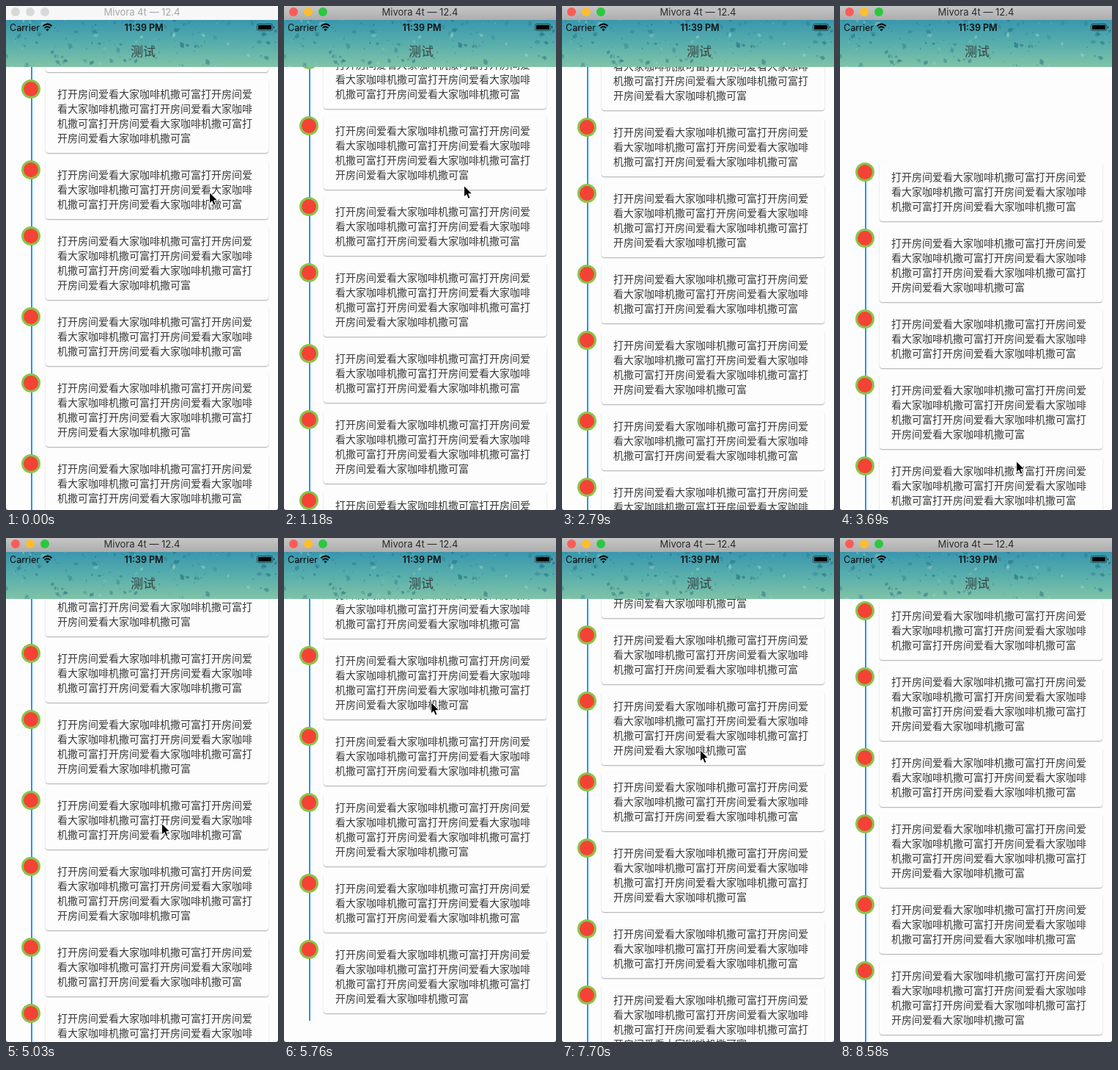
These frames come from a looping animation (371x686 px, 8.88 s). An HTML page:

```html
<!DOCTYPE html>
<html lang="zh-CN">
<head>
<meta charset="utf-8">
<title>Timeline list</title>
<style>
html, body { margin: 0; width: 100%; height: 100%; overflow: hidden; background: #3a3a3a; }
#win {
  position: absolute; left: 0; top: 0; width: 371px; height: 686px;
  overflow: hidden; background: #fdfdfd; border-radius: 0 0 3px 3px;
  font-family: Inter, Roboto, sans-serif; color: #111;
}
#win div, #win svg { position: absolute; }
#bar {
  left: 0; top: 0; width: 371px; height: 19px; z-index: 2;
  background: #f7f7f7; color: #a6a6a6;
  font-size: 13px; line-height: 17px; text-align: center;
}
#bar div { top: 2px; width: 12px; height: 12px; border-radius: 50%; background: #d9d9d9; }
#bar.on { background: linear-gradient(#c6c6c6, #adadad); color: #2b2b2b; }
#bar.on div { background: var(--c); }
#head { left: 0; top: 19px; width: 371px; height: 64px; z-index: 1; }
#head div { white-space: nowrap; }
#carrier { left: 5px; top: 2px; font-size: 12.5px; line-height: 17px; }
#clock { left: 88px; width: 200px; top: 2px; text-align: center; font-size: 12.5px; font-weight: 600; line-height: 17px; }
#title {
  left: 87px; width: 200px; top: 30px; text-align: center; color: #3a4444;
  font: 17px/24px "Noto Sans CJK SC", "Noto Sans CJK", sans-serif;
}
#list { left: 0; top: 0; width: 371px; }
.item { left: 0; width: 371px; }
.line { left: 34px; top: 0; width: 2px; height: 100%; background: #2196f3; }
.dot {
  left: 21px; top: 0; width: 20px; height: 20px; border-radius: 50%;
  border: 3px solid #8bc34a; background: #f44336;
}
.card {
  left: 54px; top: 0; bottom: 10px; width: 272px; padding: 9px 16px 0;
  border-radius: 4px; background: #fdfdfd;
  box-shadow: 0 1px 1.5px rgba(0,0,0,.32);
  font: 300 14px/20px "Noto Sans CJK SC", "Noto Sans CJK", sans-serif; color: #3a3a3a;
}
#cursor { left: 0; top: 0; z-index: 3; overflow: visible; }
</style>
</head>
<body>
<div id="win">
  <div id="list"></div>
  <div id="head">
    <svg id="sky" width="371" height="64">
      <defs><linearGradient id="sea" x2="0" y2="1">
        <stop offset="0" stop-color="#3997ae"/>
        <stop offset=".5" stop-color="#58aeac"/>
        <stop offset="1" stop-color="#80c3a7"/>
      </linearGradient></defs>
      <rect width="371" height="64" fill="url(#sea)"/>
    </svg>
    <div id="carrier">Carrier</div>
    <svg width="371" height="20" fill="none" stroke="#000" stroke-width="1.9">
      <path d="M50.4 8.3Q56.5 2.7 62.6 8.3M52.7 11Q56.5 7.4 60.3 11"/>
      <path d="M56.5 15.2L54.4 12.9Q56.5 11.2 58.6 12.9Z" fill="#000" stroke="none"/>
      <rect x="342.5" y="5.5" width="21" height="9" rx="2" stroke-width="1" opacity=".5"/>
      <rect x="344" y="7" width="18" height="6" rx=".7" fill="#000" stroke="none"/>
      <path d="M365 8.3q2 1.7 0 3.4z" fill="#000" stroke="none"/>
    </svg>
    <div id="clock">11:39 PM</div>
    <div id="title">测试</div>
  </div>
  <div id="bar">
    <div style="left:7px;--c:#fc5b57"></div>
    <div style="left:27px;--c:#fdbd2e"></div>
    <div style="left:47px;--c:#2ac840"></div>
    <span>Mivora 4t — 12.4</span>
  </div>
  <svg id="cursor" width="14" height="20">
    <path d="M.5.5V16L4 12.7L6.3 18.3L9 17.2L6.7 11.7H11.7Z" fill="#000" stroke="#fff" stroke-width="1"/>
  </svg>
</div>
<script>
const LOOP = 8880, STEP = 148, EARLY = 25, LAST = 58, FOCUS = 6, ITEMS = 12, DOT_R = 13;
const $ = id => document.getElementById(id);

// Rows alternate between three and four lines of text.
const phrase = '打开房间爱看大家咖啡机撒可富';
let rowTop = 0;
for (let i = 0; i < ITEMS; i++) {
  const h = i % 2 ? 110 : 90;
  $('list').insertAdjacentHTML('beforeend',
    `<div class="item" style="top:${rowTop}px;height:${h}px"><div class="line"></div>` +
    `<div class="card">${phrase.repeat(i % 2 ? 5 : 4)}</div><div class="dot"></div></div>`);
  rowTop += h;
}

// Mostly dark flakes over the header gradient, denser near the top.
let seed = 29;
const rnd = () => (seed = seed * 16807 % 2147483647) / 2147483647;
let flakes = '';
for (let i = 0; i < 170; i++) {
  const x = rnd() * 371, y = 64 * rnd() ** 1.3, r = 1 + 4 * rnd() ** 2, a = rnd() * 180;
  flakes += `<path d="M${-r} 0L0 ${-r * .7}L${r} ${-r * .1}L${r * .3} ${r * .7}Z" ` +
    `transform="translate(${x} ${y}) rotate(${a})" ` +
    `fill="${rnd() < .25 ? '#9fd6c8' : '#1f6a80'}" opacity="${.2 + rnd() * .4}"/>`;
}
$('sky').insertAdjacentHTML('beforeend', flakes);

const linear = p => p;
const speedUp = p => p * p;
const flick = p => p ** 3;
const coast = p => 1 - (1 - p) ** 2;
const smooth = p => p * p * (3 - 2 * p);

// Drags and flings of the list: step, y of the first dot, easing up to there.
const scroll = [
  [FOCUS, -377, linear], [12, -227, linear], [20, -32, coast],
  [25, 226, linear], [30, 96, coast],
  [36, -373, flick], [42, -583, coast], [50, -501, coast],
  [51, -501, linear], [LAST, 99, smooth]
];
// The pointer's tip: step, x, y, easing up to there. It leaves through the bottom edge.
const pointer = [
  [0, 277, 253, linear], [3, 247, 180, linear], [FOCUS, 247, 180, linear],
  [12, 240, 371, linear], [17, 240, 720, linear], [19, 240, 720, linear],
  [21, 240, 270, smooth], [25, 240, 619, linear], [30, 216, 643, smooth],
  [36, 207, 69, speedUp], [45, 181, 664, smooth], [50, 188, 180, smooth],
  [51, 188, 180, linear], [56, 186, 720, linear]
];

function at(keys, step, col) {
  const i = keys.findIndex(key => key[0] >= step);
  if (i < 0) return keys[keys.length - 1][col];
  if (!i) return keys[0][col];
  const a = keys[i - 1], b = keys[i], ease = b[b.length - 1];
  return Math.round(a[col] + (b[col] - a[col]) * ease((step - a[0]) / (b[0] - a[0])));
}

function draw() {
  const t = performance.now() % LOOP;
  const step = Math.min(LAST, Math.floor((t + EARLY) / STEP));
  $('list').style.transform = `translateY(${at(scroll, step, 1) - DOT_R}px)`;
  $('cursor').style.transform = `translate(${at(pointer, step, 1)}px,${at(pointer, step, 2)}px)`;
  $('bar').className = step >= FOCUS ? 'on' : '';
  requestAnimationFrame(draw);
}
draw();
</script>
</body>
</html>
```
